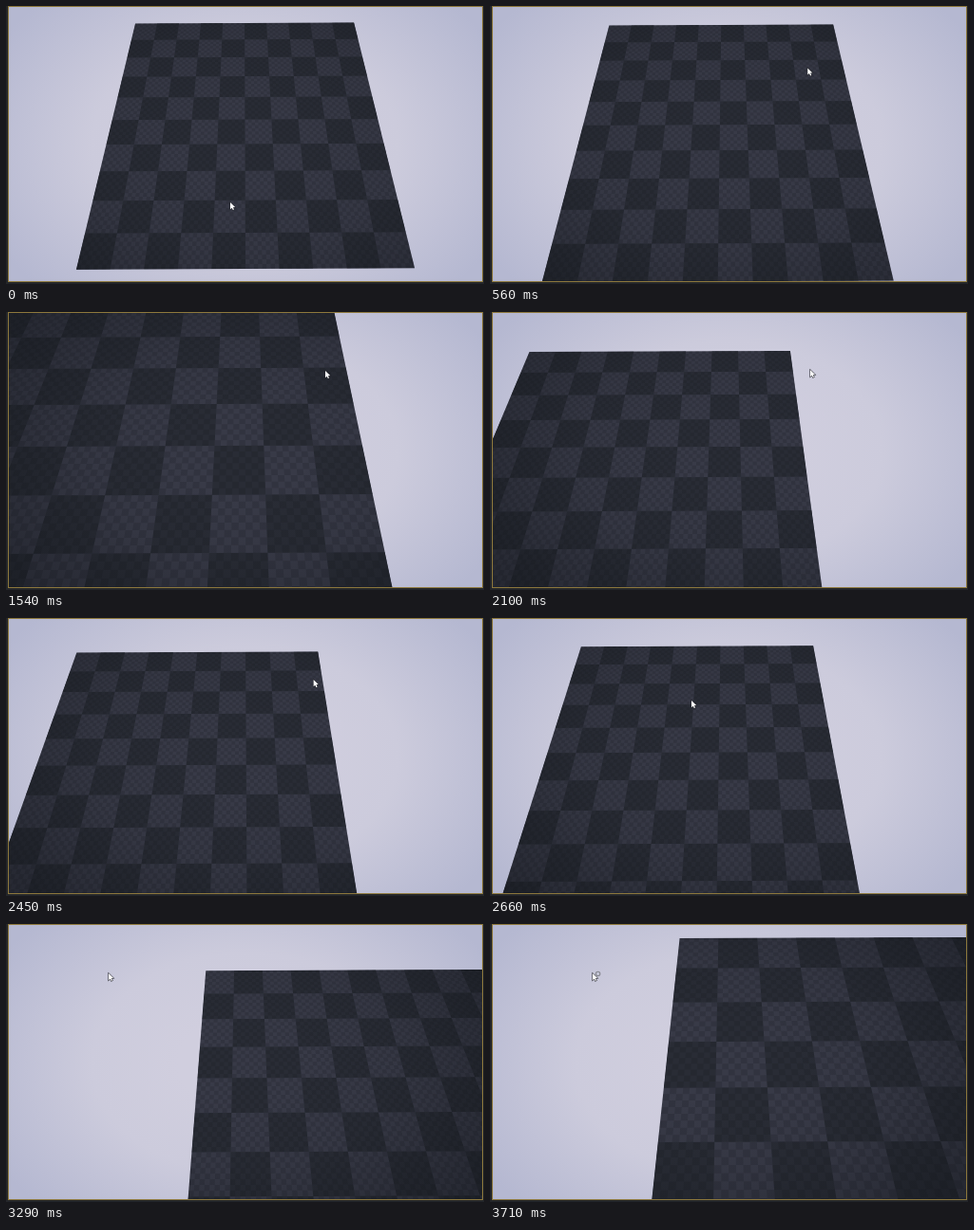
Recreate the animation shown at these times as an HTML page with a canvas. Size 503 px wide and 293 px high, loop 3.78 s.

```html
<!DOCTYPE html>
<html lang="en">
<head>
<meta charset="utf-8">
<title>Board camera</title>
<style>
html, body { margin: 0; width: 100%; height: 100%; overflow: hidden; background: #24262a; }
canvas { display: block; width: 503px; height: 293px; }
</style>
</head>
<body>
<canvas id="stage" width="503" height="293"></canvas>
<script>
const ctx = document.getElementById('stage').getContext('2d');
const W = 503, H = 293, LOOP = 3780, STEP = 70;
const CELLS = 10, SUB = 8;

// Tracks of [time, value]; the camera looks at (lookX, lookY) on the unit board.
const height = [[0, 2.0555], [420, 2.0555], [1050, 1.549], [1400, 1.152], [1540, 1.15], [1680, 1.15],
  [2100, 1.808], [2660, 1.984], [2870, 2.03], [3290, 1.692], [3640, 1.16], [3710, 1.1515]];
const lookX = [[0, .493], [420, .493], [1050, .758], [2100, .758], [2660, .629], [2870, .575], [3290, .1316], [3710, .1223]];
const lookY = [[0, .594], [420, .594], [1050, .406], [2100, .406], [2660, .508], [2870, .54], [3290, .345], [3710, .343]];
const mouseX = [[0, 236], [100, 236], [620, 338], [1050, 338], [1540, 336], [2100, 337], [2380, 337], [2660, 212], [2870, 108], [3710, 108]];
const mouseY = [[0, 207], [100, 207], [620, 60], [1050, 60], [1540, 62], [2100, 61], [2380, 61], [2660, 87], [2870, 52], [3710, 52]];

// Monotone cubic interpolation
function sample(keys, t) {
  const last = keys.length - 1;
  if (t >= keys[last][0]) return keys[last][1];
  let i = 0;
  while (t >= keys[i + 1][0]) i++;
  const slope = j => j < 0 || j >= last ? 0 : (keys[j + 1][1] - keys[j][1]) / (keys[j + 1][0] - keys[j][0]);
  const tangent = j => {
    const a = slope(j - 1), b = slope(j);
    return a * b <= 0 ? 0 : 2 * a * b / (a + b);
  };
  const [t0, a] = keys[i], [t1, b] = keys[i + 1];
  const d = t1 - t0, s = (t - t0) / d, r = 1 - s;
  return a * (1 + 2 * s) * r * r + b * s * s * (3 - 2 * s)
    + d * s * r * (tangent(i) * r - tangent(i + 1) * s);
}

function camera(t) {
  const h = sample(height, t), cx = sample(lookX, t), cy = sample(lookY, t);
  return (u, v) => {
    const drop = h / (.001538 * (cy - v) + .00167 * h);
    const x = 249.5 + (u - cx) / h * drop;
    return [x, drop - 455 - (x - 250) * .004];
  };
}

function addQuad(project, u, v, size) {
  ctx.moveTo(...project(u, v));
  ctx.lineTo(...project(u + size, v));
  ctx.lineTo(...project(u + size, v + size));
  ctx.lineTo(...project(u, v + size));
  ctx.closePath();
}

function fillCells(project, n, test, color) {
  ctx.beginPath();
  for (let r = 0; r < n; r++)
    for (let c = 0; c < n; c++)
      if (test(r, c)) addQuad(project, c / n, r / n, 1 / n);
  ctx.fillStyle = color;
  ctx.fill();
}

function radial(inner, stops) {
  const g = ctx.createRadialGradient(0, 0, inner, 0, 0, 300);
  stops.forEach(([p, c]) => g.addColorStop(p, c));
  return g;
}

function fillCentered(paint) {
  ctx.save();
  ctx.translate(W / 2, H / 2);
  ctx.scale(1, .72);
  ctx.fillStyle = paint;
  ctx.fillRect(-W / 2, -H, W, 2 * H);
  ctx.restore();
}

const backdrop = radial(70, [[0, '#d0cede'], [.4, '#cccbdc'], [1, '#b5b8d1']]);
const shade = radial(60, [[0, 'rgba(14,17,22,0)'], [.4, 'rgba(14,17,22,.08)'], [1, 'rgba(14,17,22,.42)']]);

function drawBoard(project) {
  const odd = (r, c) => (r + c) % 2 === 1;
  const fine = (r, c) => odd(r, c);
  ctx.save();
  ctx.beginPath();
  addQuad(project, 0, 0, 1);
  ctx.fillStyle = '#383a47';
  ctx.fill();
  ctx.clip();
  fillCells(project, CELLS, odd, '#292c35');
  fillCells(project, CELLS * SUB, fine, 'rgba(24,27,34,.2)');
  fillCentered(shade);
  ctx.restore();
}

function drawMouse(x, y, busy) {
  ctx.save();
  ctx.translate(x, y);
  ctx.beginPath();
  [[0, 0], [0, 7.2], [1.7, 5.7], [2.8, 8.1], [4, 7.5], [2.9, 5.2], [5.1, 5]].forEach(p => ctx.lineTo(...p));
  ctx.closePath();
  ctx.lineWidth = 1.1;
  ctx.strokeStyle = '#25262c';
  ctx.stroke();
  ctx.fillStyle = '#fff';
  ctx.fill();
  if (busy) {
    ctx.beginPath();
    ctx.arc(5.6, .4, 2.2, 0, 7);
    ctx.strokeStyle = '#85878f';
    ctx.stroke();
  }
  ctx.restore();
}

function drawFrame() {
  ctx.fillStyle = '#24262a';
  ctx.fillRect(0, 0, 2, H);
  ctx.fillRect(502, 0, 1, H);
  ctx.fillRect(0, 291, W, 2);
  ctx.strokeStyle = '#8d783c';
  ctx.lineWidth = 1;
  ctx.strokeRect(2.5, .5, 499, 290);
}

function draw(t) {
  fillCentered(backdrop);
  drawBoard(camera(t));
  drawMouse(sample(mouseX, t), sample(mouseY, t), t >= 3640);
  drawFrame();
}

const start = performance.now();
function tick() {
  const t = (performance.now() - start) % LOOP;
  draw(Math.floor(t / STEP) * STEP);
  requestAnimationFrame(tick);
}
tick();
</script>
</body>
</html>
```
